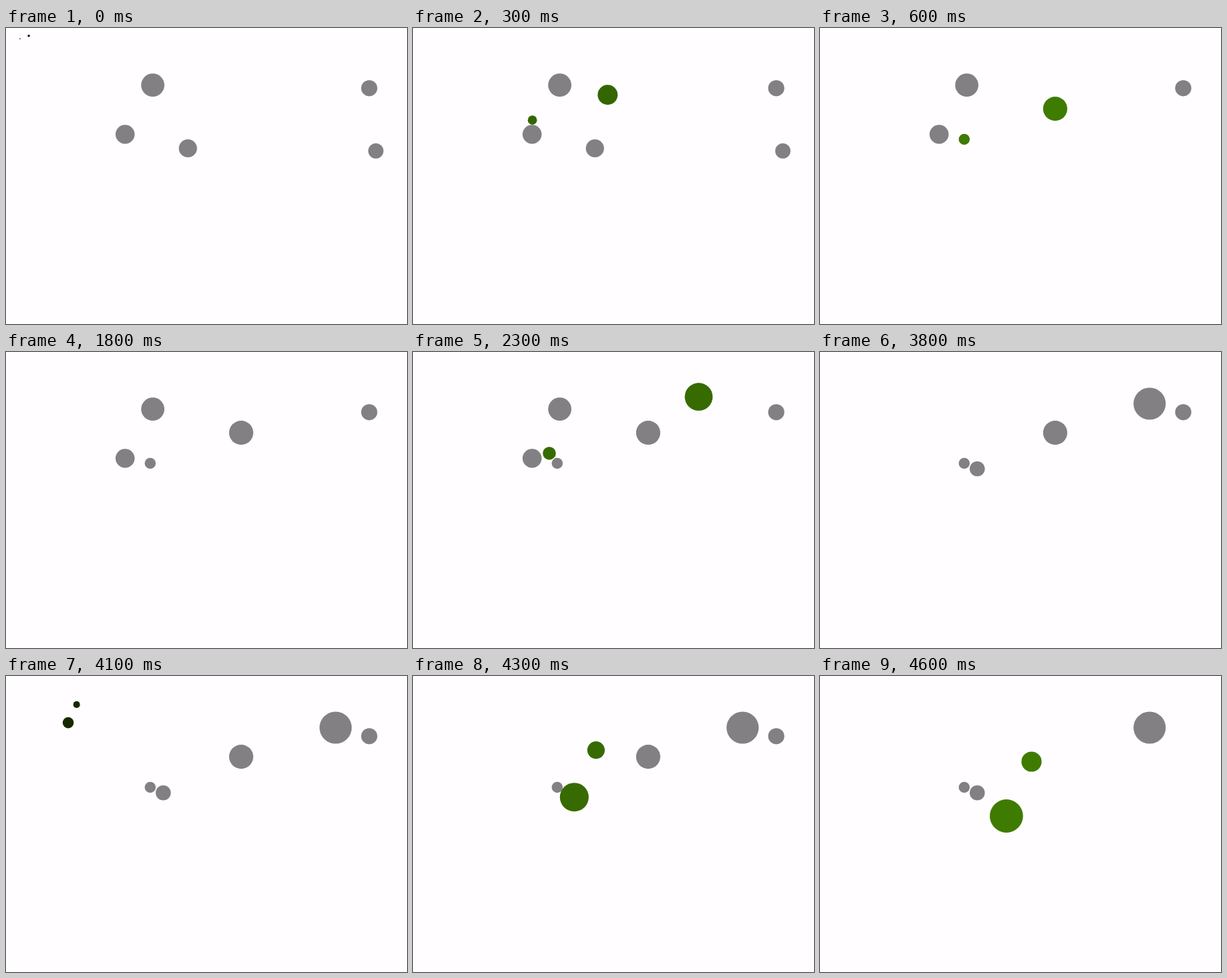
Recreate the animation shown at these times as an HTML page with a canvas. Size 600x444 px, loop 5100 ms.

```html
<!DOCTYPE html>
<html lang="en">
<head>
<meta charset="utf-8">
<title>Circles entering and leaving</title>
<style>
  html, body { margin: 0; width: 100%; height: 100%; overflow: hidden; background: #fffdff; }
  canvas { display: block; }
</style>
</head>
<body>
<canvas id="stage" width="600" height="444"></canvas>
<script>
const ctx = document.getElementById("stage").getContext("2d");
const LOOP = 5100, STEP = 100, DURATION = 833;
const GRAY = "#828082", GREEN = [63, 123, 0];

// Each round starts a transition; lead is the time already elapsed at its start.
const rounds = [
  { start: 0, lead: 241 },
  { start: 1800, lead: 65 },
  { start: 3800, lead: 64 }
];

// enter and leave are round indices; -1 is present from the beginning.
const circles = [
  { x: 219.6, y: 85.7, r: 17.4, enter: -1, leave: 1 },
  { x: 178.2, y: 159.5, r: 14.3, enter: -1, leave: 1 },
  { x: 272.2, y: 180.5, r: 13.6, enter: -1, leave: 0 },
  { x: 543.5, y: 90.3, r: 12.1, enter: -1, leave: 2 },
  { x: 553.4, y: 184.4, r: 11.4, enter: -1, leave: 0 },
  { x: 351.9, y: 121.1, r: 18.1, enter: 0, leave: 2 },
  { x: 215.8, y: 167, r: 8.3, enter: 0 },
  { x: 493.2, y: 77.5, r: 24.1, enter: 1 },
  { x: 235.3, y: 175.3, r: 11.3, enter: 1 },
  { x: 316.5, y: 128.5, r: 15.1, enter: 2 },
  { x: 278.9, y: 210, r: 24.9, enter: 2 }
];

const easeCubicInOut = t => t < 0.5 ? 4 * t ** 3 : 1 - 4 * (1 - t) ** 3;

function drawCircle({ x, y, r }, scale, color) {
  ctx.fillStyle = color;
  ctx.beginPath();
  ctx.arc(x * scale, y * scale, r * scale, 0, 2 * Math.PI);
  ctx.fill();
}

function draw(time) {
  const now = Math.floor((time % LOOP) / STEP) * STEP;
  const current = rounds.findLastIndex(round => now >= round.start);
  const { start, lead } = rounds[current];
  const t = Math.min(1, (now - start + lead) / DURATION);
  const progress = easeCubicInOut(t);
  const green = `rgb(${GREEN.map(c => Math.round(c * progress))})`;

  ctx.fillStyle = "#fffdff";
  ctx.fillRect(0, 0, 600, 444);
  for (const circle of circles) {
    const { enter, leave = Infinity } = circle;
    if (enter > current || leave < current || (leave === current && t === 1)) continue;
    if (enter === current) drawCircle(circle, progress, green);
    else drawCircle(circle, 1, GRAY);
  }
}

const origin = performance.now();
function tick() {
  draw(performance.now() - origin);
  requestAnimationFrame(tick);
}
tick();
</script>
</body>
</html>
```
